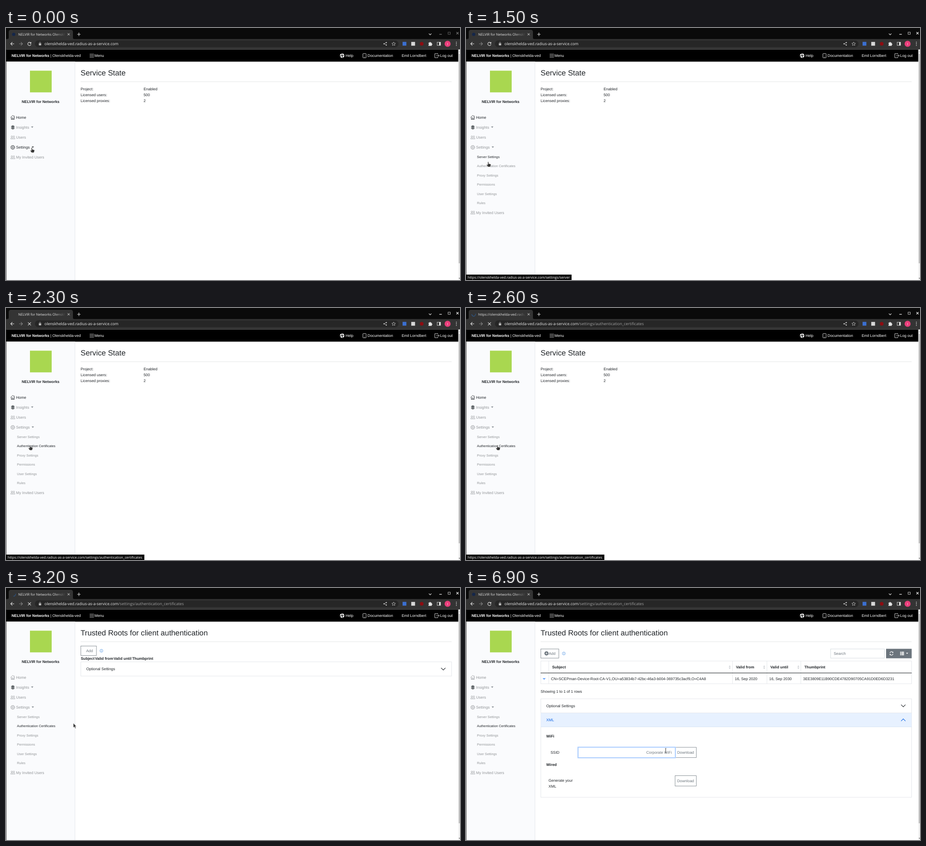
Write an HTML page that moves like this. It is 1004 px wide and 558 px high and loops after 8000 ms.

```html
<!DOCTYPE html>
<html lang="en">
<head>
<meta charset="utf-8">
<title>Service settings</title>
<style>
  html, body { margin: 0; width: 100%; height: 100%; overflow: hidden; background: #fff; }
  svg { display: block; width: 1004px; height: 558px; }
  text { font-family: "Liberation Sans", Arial, sans-serif; text-rendering: geometricPrecision; }
  text.ui { font-family: "Open Sans", "Noto Sans", sans-serif; }
</style>
</head>
<body>
<svg id="stage" viewBox="0 0 1004 558"></svg>
<script>
const LOOP = 8000, STEP = 100;
const INK = '#212529', MUTED = '#929598', GREY = '#6c757d', LINE = '#dee2e6', BLUE = '#0c63e4';
const PRODUCT = 'NELVIR for Networks', TENANT = 'Olenskhelda-ved', USER = 'Emil Lorndbert';
const HOST = TENANT.toLowerCase() + '.radius-as-a-service.com';
const CERT_PATH = '/settings/authentication_certificates';
const SUBMENU = ['Server Settings', 'Authentication Certificates', 'Proxy Settings',
  'Permissions', 'User Settings', 'Rules'];
const CURSOR = [[0, 54.5, 264.5], [1000, 54.5, 264.5], [1100, 45.5, 292], [1500, 46.5, 296],
  [1700, 48.5, 303.5], [1900, 50.5, 303.5], [2300, 50.5, 303.5], [2900, 83.5, 303.5], [3400, 192.5, 296.5]];

// y is the middle of the capital letters
const text = (x, y, s, fill = INK, size = 8.37, extra = '') =>
  `<text x="${x}" y="${y + size * .36}" fill="${fill}" font-size="${size}" ${extra}>${s}</text>`;
const bold = (x, y, s, fill = INK, extra = '') => text(x, y, s, fill, 8.37, 'font-weight="700" ' + extra);
const ui = (x, y, s, fill, size) => text(x, y, s, fill, size, 'class="ui"');
const rect = (x, y, w, h, fill, extra = '') =>
  `<rect x="${x}" y="${y}" width="${w}" height="${h}" fill="${fill}" ${extra}/>`;
const box = (x, y, w, h, stroke, fill = 'none') => rect(x, y, w, h, fill, `stroke="${stroke}" stroke-width=".8"`);
const disc = (x, y, r, fill) => `<circle cx="${x}" cy="${y}" r="${r}" fill="${fill}"/>`;
const ring = (x, y, r, stroke, w = .8, extra = '') =>
  `<circle cx="${x}" cy="${y}" r="${r}" fill="none" stroke="${stroke}" stroke-width="${w}" ${extra}/>`;
const line = (d, stroke, w = .8) => `<path d="${d}" fill="none" stroke="${stroke}" stroke-width="${w}"/>`;
const shape = (d, fill, extra = '') => `<path d="${d}" fill="${fill}" ${extra}/>`;
const caret = (x, y, fill) => shape(`M${x - 2.6} ${y - 1.2}h5.2l-2.6 2.6z`, fill);
const chevron = (x, y, r, stroke, dir = 1, w = 1.1) =>
  line(`M${x - r} ${y - dir * r / 2}l${r} ${dir * r} ${r} ${-dir * r}`, stroke, w);

const icons = {
  house: (y, c) => line(`M10.3 ${y}l4.7-4.6 4.7 4.6M11.6 ${y - 1}v5.4h6.8v-5.4M13.7 ${y + 4.4}v-3.2h2.6v3.2M18 ${y - 4}v2`, c),
  stack: y => [3, .6, -1.8].map(d =>
    shape(`M10.3 ${y + d}l4.8-2.4 4.8 2.4-4.8 2.4z`, '#555a5e', 'stroke="#fafbfd" stroke-width=".4"')).join(''),
  people: (y, c) => ring(12.9, y - 1.6, 1.6, c, .7) + ring(17.4, y - 1.6, 1.6, c, .7) +
    line(`M10.4 ${y + 3.6}q0-2.8 2.5-2.8t2.5 2.8zM15.8 ${y + 1.2}q3.8-1.2 4 2.4h-4`, c, .7),
  gear: (y, c) => ring(15, y, 3.9, c, .8) + ring(15, y, 4.5, c, .7, 'stroke-dasharray="1.77"') + ring(15, y, 1.6, c, .8),
};

function position(q) {
  const next = CURSOR.findIndex(k => k[0] > q);
  if (next < 0) return CURSOR.at(-1).slice(1);
  const [a, b] = [CURSOR[next - 1], CURSOR[next]], f = (q - a[0]) / (b[0] - a[0]);
  return [a[1] + f * (b[1] - a[1]), a[2] + f * (b[2] - a[2])];
}

function pointer(q) {
  const edge = 'stroke="#fff" stroke-width=".6"', [x, y] = position(q);
  if (q >= 6900) return line('M440 354.8q1.6 0 1.6 1v8.4q0 1-1.6 1M443.2 354.8q-1.6 0-1.6 1v8.4q0 1 1.6 1', '#333', .7);
  const d = q >= 3100 ? 'M0 0v10l2.3-2 1.8 3.8 1.7-.8-1.8-3.6h2.9z'
    : 'M1.6.9q1-1.7 2 0v3.4l4 .9q1.3.4 1 1.8l-.8 3q-.3 1.5-1.7 1.5h-3q-1.2 0-2-1.2l-2.2-3.5q.8-1.3 2.7.2z';
  return `<g transform="translate(${x} ${y})">${shape(d, '#363636', edge)}</g>`;
}

function tabIcon(q, loading) {
  if (!loading) return disc(17, 14, 3.6, '#14264a');
  if (q < 2400) return '';
  const sweep = q < 3200 ? 14 : 8, angle = q < 3200 ? (q - 2900) * .36 + 90 : (q - 3400) * .9 + 165;
  return ring(17, 14, 4.1, '#2a5f9e', 1.1, `stroke-dasharray="${sweep} 40" transform="rotate(${angle} 17 14)"`);
}

function browser(q) {
  const loading = q >= 2300 && q < 6900, moved = q >= 2400;
  const wm = q < 1100 ? '#777' : '#eee', w = '#e6e6e6';
  const title = moved && q < 3200 ? 'https://' + HOST : `${PRODUCT} ${TENANT}`;
  return rect(0, 0, 1004, 25, '#0a0a0a') +
    shape('M2 25q4 0 4-4V9q0-5 5-5h132q5 0 5 5v12q0 4 4 4z', '#343434') +
    rect(0, 24.5, 1004, 23.2, '#343434') + rect(64, 27.5, 804, 15, '#262626', 'rx="7.5"') +
    tabIcon(q, loading) +
    `<g clip-path="url(#tab)">${ui(27, 14, title, w, 7.67)}</g>` + rect(108, 6, 24, 16, 'url(#fade)') +
    line('M136.2 11.7l4.6 4.6m0-4.6l-4.6 4.6', w, 1) + line('M157.5 14h7.4m-3.7-3.7v7.4', w, 1.1) +
    chevron(938, 13.8, 2.8, w, 1, 1.2) +
    line('M958.2 14h5.6', wm, 1.3) + box(977.7, 9.2, 4.8, 4.8, wm) + line('M996 9l5 5m0-5l-5 5', wm, 1.1) +
    line('M18 35h-7.5m3.6-3.7l-3.7 3.7 3.7 3.7', w, 1.1) + line('M29 35h7.5m-3.6-3.7l3.7 3.7-3.7 3.7', '#888', 1.1) +
    (loading ? line('M48.6 31.8l6.6 6.6m0-6.6l-6.6 6.6', w, 1.1)
      : line('M54.8 33.2a3.6 3.6 0 1 0 .5 2.9', w, 1.1) + shape('M55.8 30.8v3.6h-3.6z', w)) +
    rect(72.6, 34, 5.2, 4.4, '#bbb', 'rx=".6"') + line('M73.7 34v-1.2a1.5 1.5 0 0 1 3 0v1.2', '#bbb') +
    ui(85, 35, HOST + (moved ? `<tspan fill="#a5a5a5">${CERT_PATH}</tspan>` : ''), '#f0f0f0', 8.68) +
    line('M841 32.4l-5 2.6 5 2.6', '#ccc', .7) + [[841, 32.3], [836, 35], [841, 37.7]].map(p => disc(...p, 1.3, '#ccc')).join('') +
    line('M857.3 31l1.2 2.6 2.9.3-2.2 1.9.7 2.9-2.6-1.5-2.6 1.5.7-2.9-2.2-1.9 2.9-.3z', '#ccc') +
    rect(877, 30.7, 8.4, 8.4, '#3b6fd0') + rect(896.2, 30.8, 8.4, 8.4, '#d8d8d8') + disc(919.3, 35, 4.1, '#8c0d12') +
    shape('M934.3 32.4h2.2a1.4 1.4 0 0 1 2.8 0h2.2v2.3a1.4 1.4 0 0 1 0 2.8v2h-7.2v-2.2a1.4 1.4 0 0 0 0-2.7z', w) +
    box(953.4, 31.4, 7.6, 7, w) + rect(957.8, 31.4, 3.2, 7, w) +
    disc(976.6, 35, 6.7, '#e83e7a') + ui(975.6, 35, 'I', '#fff', 7) +
    [31.4, 35, 38.6].map(y => disc(996, y, .9, w)).join('');
}

function topBar() {
  const w = '#fff';
  return rect(0, 47.7, 1000.5, 26.8, '#000') +
    bold(12.3, 61, `${PRODUCT}<tspan font-weight="400"> | ${TENANT}</tspan>`, w) +
    line('M185 58h9.5m-9.5 3.2h9.5m-9.5 3.2h9.5', w) + text(195.7, 61, 'Menu', w) +
    ring(743.4, 61.2, 3.3, w, 2.6, 'stroke-dasharray="3.4 1.78"') + ring(743.4, 61.2, 4.6, w, .7) + ring(743.4, 61.2, 2, w, .7) +
    text(751, 61, 'Help', w) +
    rect(789.2, 56.6, 7.2, 9.4, 'none', 'rx="1" stroke="#fff" stroke-width=".8"') + disc(792.8, 64.4, .6, w) +
    text(799.6, 61, 'Documentation', w) + text(875, 61, USER, w) +
    line('M955 58.5v-1.7h-6.8v9h6.8v-1.8M951.5 61.3h6.6m-2-2l2 2-2 2', w) + text(960, 61, 'Log out', w);
}

function sidebar(q) {
  const open = q >= 1100, home = q < 3200 ? INK : MUTED, settings = open ? MUTED : INK;
  const invited = open ? 408.5 : 286;
  const subColor = i =>
    i === 0 ? (q < 1700 ? INK : q < 1800 ? '#666a6e' : MUTED) :
    i === 1 ? (q < 1700 ? MUTED : q < 1800 ? '#4c5054' : INK) : MUTED;
  return rect(0, 74.5, 152.5, 484, '#fafbfd') + rect(152.2, 74.5, .8, 484, LINE) + rect(0, 47, .8, 511, '#222') +
    rect(53, 94.5, 48, 48, '#a9d750') + bold(76.5, 162.5, PRODUCT, INK, 'text-anchor="middle"') +
    icons.house(198, home) + text(22.3, 198, 'Home', home) +
    icons.stack(219.5) + text(22.3, 220, 'Insights', MUTED) + caret(58, 219.4, GREY) +
    icons.people(242, MUTED) + text(22.3, 242, 'Users', MUTED) +
    icons.gear(264.3, settings) + text(22.3, 264, 'Settings', settings) + caret(59.3, 263.6, open ? GREY : INK) +
    (open ? SUBMENU.map((s, i) => text(24.3, 285.2 + 20.45 * i, s, subColor(i), 7.32)).join('') : '') +
    icons.people(invited, MUTED) + text(22.3, invited, 'My Invited Users', MUTED);
}

const heading = s => text(165, 99, s, INK, 16.74) + rect(165, 118.6, 820.5, .7, '#d8d9da');
const info = (x, y) => ring(x, y, 3.3, '#3f8ae0', .7) + rect(x - .4, y - .6, .8, 2.4, '#3f8ae0') + disc(x, y - 1.7, .5, '#3f8ae0');

const servicePage = () => heading('Service State') +
  [['Project:', 'Enabled'], ['Licensed users:', '500'], ['Licensed proxies:', '2']].map(([k, v], i) =>
    text(165, 135.2 + 12.75 * i, k) + text(304.2, 135.2 + 12.75 * i, v)).join('');

const loadingPage = () => heading('Trusted Roots for client authentication') +
  box(165.4, 128.5, 34.6, 21, GREY) + text(177.3, 139, 'Add', GREY) + info(211, 139) +
  [[165.5, 'Subject'], [196.7, 'Valid from'], [238, 'Valid until'], [279, 'Thumbprint']].map(([x, s]) => bold(x, 156, s)).join('') +
  box(165.4, 163.6, 820, 31.4, LINE) + text(177.5, 179, 'Optional Settings') + chevron(967, 179.3, 4.8, INK);

function tablePage() {
  const head = [[190.5, 'Subject'], [597, 'Valid from'], [673, 'Valid until'], [748.2, 'Thumbprint']];
  const row = [[188, 'CN=SCEPman-Device-Root-CA-V1,OU=a53834b7-42bc-46a3-b004-369735c3acf9,O=C4A8'],
    [594.5, '16, Sep 2020'], [670.5, '16, Sep 2030'], [745.5, '3EE3809E11B90CDE4782D90705CA91D0ED6D3231']];
  const download = y => box(462.3, y, 47, 22.8, GREY, '#fff') + text(467, y + 11.4, 'Download', GREY);
  return heading('Trusted Roots for client authentication') +
    box(165.4, 135, 39.8, 20.2, GREY) + disc(178, 144.8, 4.6, GREY) + line('M175.6 144.8h4.8m-2.4-2.4v4.8', '#fff', .9) +
    text(183, 145, 'Add', GREY) + info(216.3, 145) +
    box(806.3, 135, 119, 20.2, '#ced4da') + text(813.3, 145, 'Search', GREY) +
    rect(929, 134.6, 56.6, 21, GREY) +
    line('M937.4 144a3.6 3.6 0 0 1 6.4-1.6M944.4 145.8a3.6 3.6 0 0 1-6.4 1.6', '#fff', 1.2) +
    shape('M944.9 140.8v3h-3zM936.9 149v-3h3z', '#fff') +
    [141.2, 144, 146.8].map(y => rect(960, y, 2, 2, '#fff') + rect(962.7, y, 6, 2, '#fff')).join('') + caret(975.5, 144.6, '#fff') +
    box(165.4, 161.8, 820, 50.2, LINE) + [183, 589.3, 665.5, 740.5].map(x => rect(x - .4, 161.8, .8, 50.2, LINE)).join('') +
    rect(165, 187.6, 820.6, 1.1, INK) +
    head.map(([x, s]) => bold(x, 175.3, s)).join('') + row.map(([x, s]) => text(x, 200.7, s)).join('') +
    [583.2, 659.4, 735].map(x => shape(`M${x - 2.2} 174.6l2.2-3 2.2 3zm0 1.6h4.4l-2.2 3z`, '#c9ccd0')).join('') +
    chevron(172.8, 200.8, 2.3, '#0d6efd', 1, 1.3) +
    text(165, 228.7, 'Showing 1 to 1 of 1 rows') +
    box(165.4, 245.3, 820, 218, LINE) + text(177.5, 260.5, 'Optional Settings') + chevron(967, 260.8, 4.8, INK) +
    rect(165.4, 276.5, 820, 31, '#e7f1ff') + rect(165.4, 276.2, 820, .7, LINE) + rect(165.4, 307.2, 820, .7, '#cfdcef') +
    text(177.5, 292, 'XML', BLUE) + chevron(967, 292.3, 4.8, BLUE, -1) +
    bold(177.5, 327.7, 'WiFi') + text(187, 364.2, 'SSID') + download(352.8) +
    rect(246.3, 351.2, 218, 26, '#c2dbfe', 'rx="1"') + box(248.2, 353, 214.2, 22.4, '#86b7fe', '#fff') +
    text(455, 364.2, 'Corporate WiFi', GREY, 8.37, 'text-anchor="end"') +
    bold(177.5, 391, 'Wired') + text(182.5, 426, 'Generate your') + text(182.5, 438.5, 'XML') + download(415.6);
}

function statusBar(q) {
  if (q < 1100 || q >= 3100) return '';
  const cert = q >= 1700, opacity = q < 2900 ? 1 : .6 - (q - 2900) / 300;
  return rect(0, 546, cert ? 306 : 233.5, 12, '#0b0b0b', `opacity="${opacity}"`) +
    `<g opacity="${q < 2900 ? 1 : opacity + .35}">` +
    ui(3.7, 552, 'https://' + HOST + (cert ? CERT_PATH : '/settings/server'), '#fff', 7.65) + '</g>';
}

const scrollBar = () => rect(1000.5, 47.7, 3.5, 511, '#f1f1f1') + rect(1001, 57, 3, 464, '#c1c1c1') +
  shape('M1001.2 53.6l1.5-2 1.3 2z', '#999') + shape('M1001.2 553.6h2.8l-1.3 2z', '#444');

const DEFS = `<defs><clipPath id="tab"><path d="M27 6h104v17H27z"/></clipPath>
  <linearGradient id="fade"><stop stop-color="#343434" stop-opacity="0"/><stop offset="1" stop-color="#343434"/></linearGradient></defs>`;

const scene = q => DEFS + rect(0, 0, 1004, 558, '#fff') + browser(q) + topBar() + sidebar(q) +
  (q < 3200 ? servicePage() : q < 6900 ? loadingPage() : tablePage()) +
  scrollBar() + statusBar(q) + pointer(q);

const stage = document.getElementById('stage');
let shown = -1;
function draw() {
  const q = Math.floor(performance.now() % LOOP / STEP) * STEP;
  if (q !== shown) stage.innerHTML = scene(shown = q);
  requestAnimationFrame(draw);
}
draw();
</script>
</body>
</html>
```
